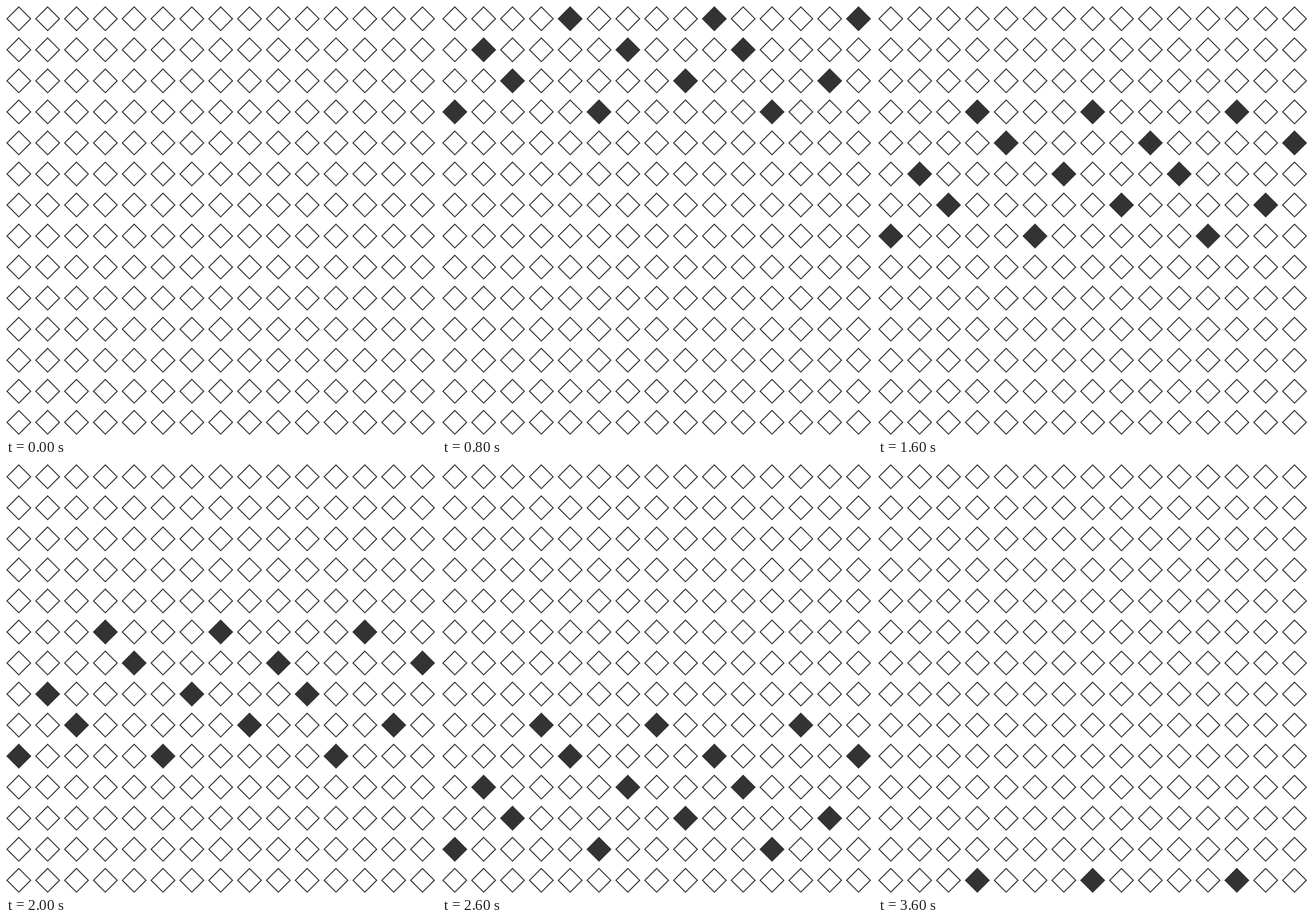
An HTML page with a canvas for the animation above (3.9 s loop, 748 by 748 pixels).

```html
<!DOCTYPE html>
<html lang="en">
<head>
<meta charset="utf-8">
<title>Falling diamonds</title>
<style>
  html, body { margin: 0; width: 100%; height: 100%; overflow: hidden; background: #fff; }
  canvas { display: block; width: 748px; height: 748px; }
</style>
</head>
<body>
<canvas id="stage" width="748" height="748"></canvas>
<script>
const ctx = document.getElementById('stage').getContext('2d');
const SIZE = 748, COLS = 15, ROWS = 14;
const LEFT = 22.3, TOP = 22.2, STEP_X = 50.16, STEP_Y = 54, HALF = 20.6;
const LOOP = 3900, TICK = 200, LAST = 18;

// Filled columns of each row in the falling group, lowest row first
const GROUP = [[0, 5, 11], [2, 8, 13], [1, 6, 10], [4, 9, 14], [3, 7, 12]];

function diamond(col, row, filled) {
  const x = LEFT + col * STEP_X, y = TOP + row * STEP_Y;
  ctx.beginPath();
  ctx.moveTo(x, y - HALF);
  ctx.lineTo(x + HALF, y);
  ctx.lineTo(x, y + HALF);
  ctx.lineTo(x - HALF, y);
  ctx.closePath();
  if (filled) ctx.fill();
  ctx.stroke();
}

function draw(time) {
  const step = Math.min(LAST, Math.floor((time % LOOP) / TICK));
  ctx.fillStyle = '#fff';
  ctx.fillRect(0, 0, SIZE, SIZE);
  ctx.fillStyle = ctx.strokeStyle = '#333';
  ctx.lineWidth = 1.8;
  for (let row = 0; row < ROWS; row++) {
    const filled = GROUP[step - 1 - row] || [];
    for (let col = 0; col < COLS; col++) diamond(col, row, filled.includes(col));
  }
}

const start = performance.now();
function frame() {
  draw(performance.now() - start);
  requestAnimationFrame(frame);
}
frame();
</script>
</body>
</html>
```
